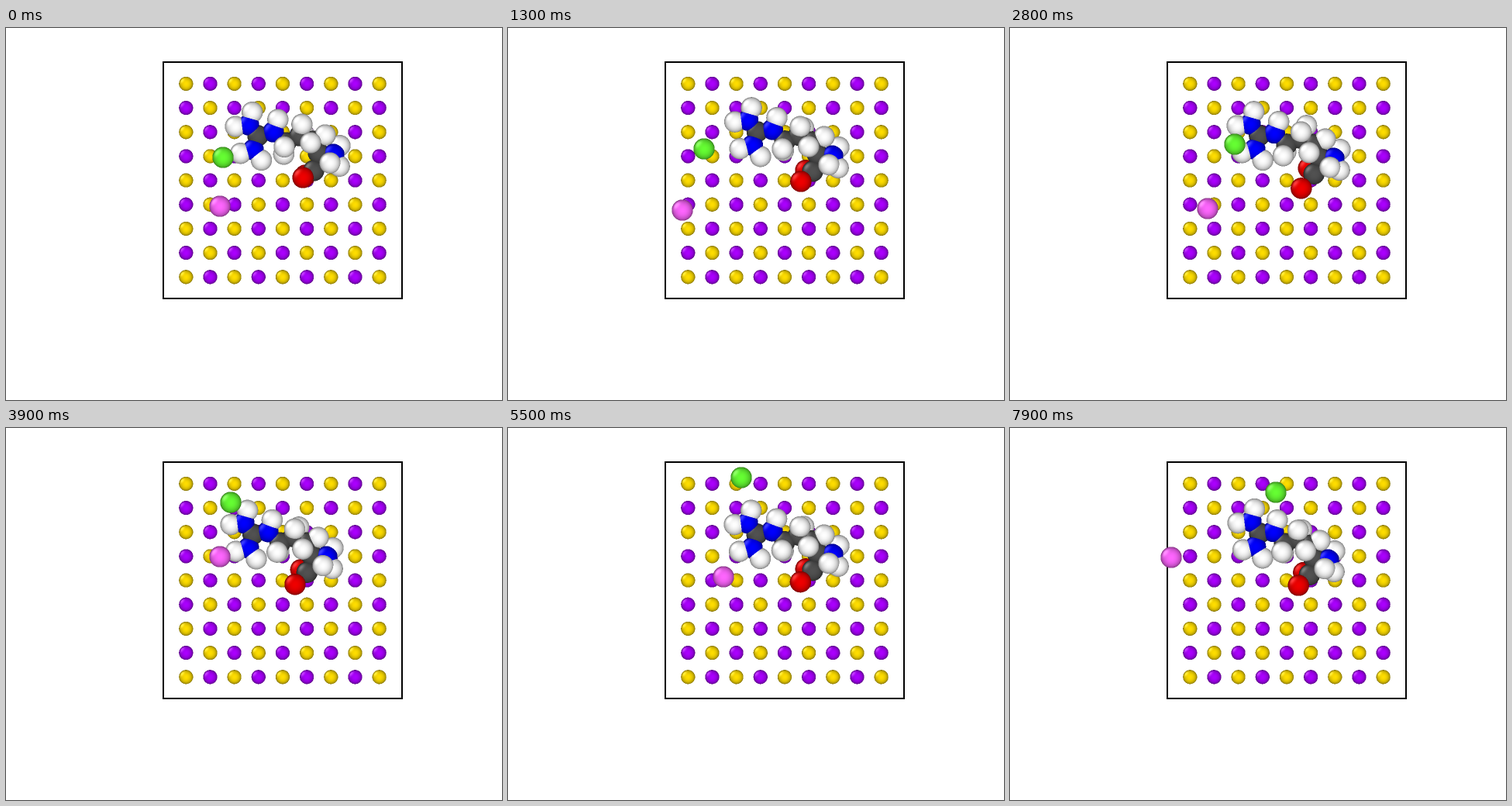
These frames come from a looping animation (640x480 px, 8000 ms). A matplotlib script:

```python
import numpy as np
import matplotlib.pyplot as plt
from matplotlib.animation import FuncAnimation

W, H, DPI, SS = 640, 480, 100, 2
FRAMES, INTERVAL = 80, 100
R_ATOM, R_SITE = 13.7, 9.1
LEFT, TOP, RIGHT, BOTTOM = 203, 44, 511, 349
FRONT = 36  # depth of the cell outline

COLORS = {
    "H": (1, 1, 1), "C": (0.32, 0.32, 0.32), "N": (0, 0, 1), "O": (0.94, 0, 0),
    "yellow": (1, 0.87, 0), "purple": (0.67, 0, 1),
    "green": (0.4, 1, 0.2), "pink": (1, 0.4, 1),
}
LIGHT = np.array((-1.8, -1.5, -0.2)) / np.linalg.norm((1.8, 1.5, 0.2))

# Heavy atoms of the chain: kind, x, y
SKELETON = {
    "n1": ("N", 313, 125), "cz": ("C", 325, 139), "n2": ("N", 319, 157),
    "n3": ("N", 345, 134), "c1": ("C", 361, 148), "c2": ("C", 379, 139),
    "c3": ("C", 397, 146), "ca": ("C", 403, 161), "n4": ("N", 423, 163),
    "co": ("C", 397, 184),
}
# Outer atoms: parent, kind, bond angle in the plane, rise towards the viewer
BONDS = (
    ("n1", "H", -74, 0), ("n1", "H", 173, 0), ("n2", "H", 164, 1), ("n2", "H", 52, 1),
    ("n3", "H", -70, 1), ("c1", "H", 110, 16), ("c1", "H", 100, -8),
    ("c2", "H", -79, 8), ("c2", "H", -39, -16), ("c3", "H", 153, 16.4),
    ("c3", "H", -28, 2), ("n4", "H", -55, -10), ("n4", "H", 65, 2),
    ("n4", "H", 114, 12), ("co", "O", 147, 13), ("co", "O", 151, -17),
)
BOND = {"H": 17, "O": 21}


def build():
    kinds, points = [], []
    for kind, x, y in SKELETON.values():
        kinds.append(kind)
        points.append((x, y, 3 if kind == "N" else 0))
    for parent, kind, angle, rise in BONDS:
        pk, x, y = SKELETON[parent]
        reach = np.sqrt(BOND[kind] ** 2 - rise**2)
        a = np.radians(angle)
        kinds.append(kind)
        points.append((x + reach * np.cos(a), y + reach * np.sin(a),
                       rise + (3 if pk == "N" else 0)))
    return kinds, np.array(points, float)


KINDS, ATOMS = build()

# Drift of both ends of the chain and the twist of its middle
KEYS = (0, 13, 28, 39, 55, 66, 79)
HEAD = ((0, 0), (-3.5, -6), (-3, -1), (-6, -2.5), (-4, -2.5), (.5, 0), (-2, -4.5))
TAIL = ((0, 0), (-4, 2), (-5, 5), (-9, 3), (-4, 0), (-3, 4), (-12, 7))
TWIST = (0, .5, 1, .7, .6, 1.2, .6)

GREEN = ((280, 167), (253, 156), (290, 150), (290, 96), (301, 64), (361, 45), (343, 83))
PINK_KEYS = (0, 13, 18, 28, 32, 39, 50, 55, 66, 79)
PINK = ((276, 230), (225, 235), (214, 260), (255, 233), (252, 252),
        (276, 166), (225, 205), (278, 192), (270, 198), (208, 167))

rng = np.random.default_rng(4)
PHASE = rng.uniform(0, 2 * np.pi, (len(ATOMS), 2))
SPEED = rng.uniform(0.7, 1.7, (len(ATOMS), 2))


def along(f, keys, points):
    return np.array([np.interp(f, keys, axis) for axis in zip(*points)])


def pose(f):
    """Atom positions: bend by both ends, twist the middle, then shake."""
    x, z = ATOMS[:, 0], ATOMS[:, 2]
    t = np.clip((x - 315) / 95, 0, 1)[:, None]
    xy = ATOMS[:, :2] + (1 - t) * along(f, KEYS, HEAD) + t * along(f, KEYS, TAIL)
    roll = np.interp(f, KEYS, TWIST) * z * np.exp(-((x - 375) / 25) ** 2)
    xy += roll[:, None] * (-0.25, 0.9)
    sway = 1.5 * abs(np.sin(np.pi * np.interp(f, KEYS, range(len(KEYS)))))
    return xy + sway * np.sin(SPEED * f + PHASE)


def ball(img, depth, x, y, z, r, color):
    """Shade one sphere into the depth-tested canvas."""
    x0, x1 = int((x - r) * SS), int((x + r) * SS) + 2
    y0, y1 = int((y - r) * SS), int((y + r) * SS) + 2
    nx = ((np.arange(x0, x1) + 0.5) / SS - x)[None, :] / r
    ny = ((np.arange(y0, y1) + 0.5) / SS - y)[:, None] / r
    d = 1 - nx**2 - ny**2
    nz = np.sqrt(np.maximum(d, 0))
    win = np.s_[y0:y1, x0:x1]
    top = z + r * nz
    mask = (d > 0) & (top > depth[win])
    glint = 2 * nz * (nx * LIGHT[0] + ny * LIGHT[1] + nz * LIGHT[2]) - LIGHT[2]
    spec = 0.25 * np.maximum(glint, 0) ** 6
    rgb = np.array(COLORS[color]) * (0.4 + 0.6 * nz)[..., None] + spec[..., None]
    img[win][mask] = np.minimum(rgb, 1)[mask]
    depth[win][mask] = top[mask]


def backdrop():
    img = np.ones((H * SS, W * SS, 3), np.float32)
    depth = np.full((H * SS, W * SS), -1e3, np.float32)
    for j in range(9):
        for i in range(9):
            kind = "purple" if (i + j) % 2 else "yellow"
            ball(img, depth, 232.3 + 31.17 * i, 71.9 + 31.17 * j, -60, R_SITE, kind)
    outline = np.zeros(depth.shape, bool)
    outline[(TOP - 1) * SS:(BOTTOM + 1) * SS, (LEFT - 1) * SS:(RIGHT + 1) * SS] = True
    outline[(TOP + 1) * SS:(BOTTOM - 1) * SS, (LEFT + 1) * SS:(RIGHT - 1) * SS] = False
    img[outline], depth[outline] = 0, FRONT
    return img, depth


BASE, BASE_DEPTH = backdrop()


def render(f):
    img, depth = BASE.copy(), BASE_DEPTH.copy()
    for kind, (x, y), z in zip(KINDS, pose(f), ATOMS[:, 2]):
        ball(img, depth, x, y, z, R_ATOM, kind)
    gx, gy = along(f, KEYS, GREEN)
    if gy < TOP + 1.5:  # periodic boundary
        gy += BOTTOM - TOP
    px, py = along(f, PINK_KEYS, PINK)
    ball(img, depth, gx, gy, 22, R_ATOM, "green")
    ball(img, depth, px, py, FRONT + 4, R_ATOM, "pink")
    return img.reshape(H, SS, W, SS, 3).mean((1, 3))


fig = plt.figure(figsize=(W / DPI, H / DPI), dpi=DPI, facecolor="white")
ax = fig.add_axes((0, 0, 1, 1))
picture = ax.imshow(render(0), extent=(0, W, H, 0), interpolation="nearest", aspect="auto")
ax.axis("off")


def update(f):
    picture.set_data(render(f))
    return (picture,)


anim = FuncAnimation(fig, update, frames=FRAMES, interval=INTERVAL, repeat=True,
                     repeat_delay=0, blit=False)
plt.show()
```
